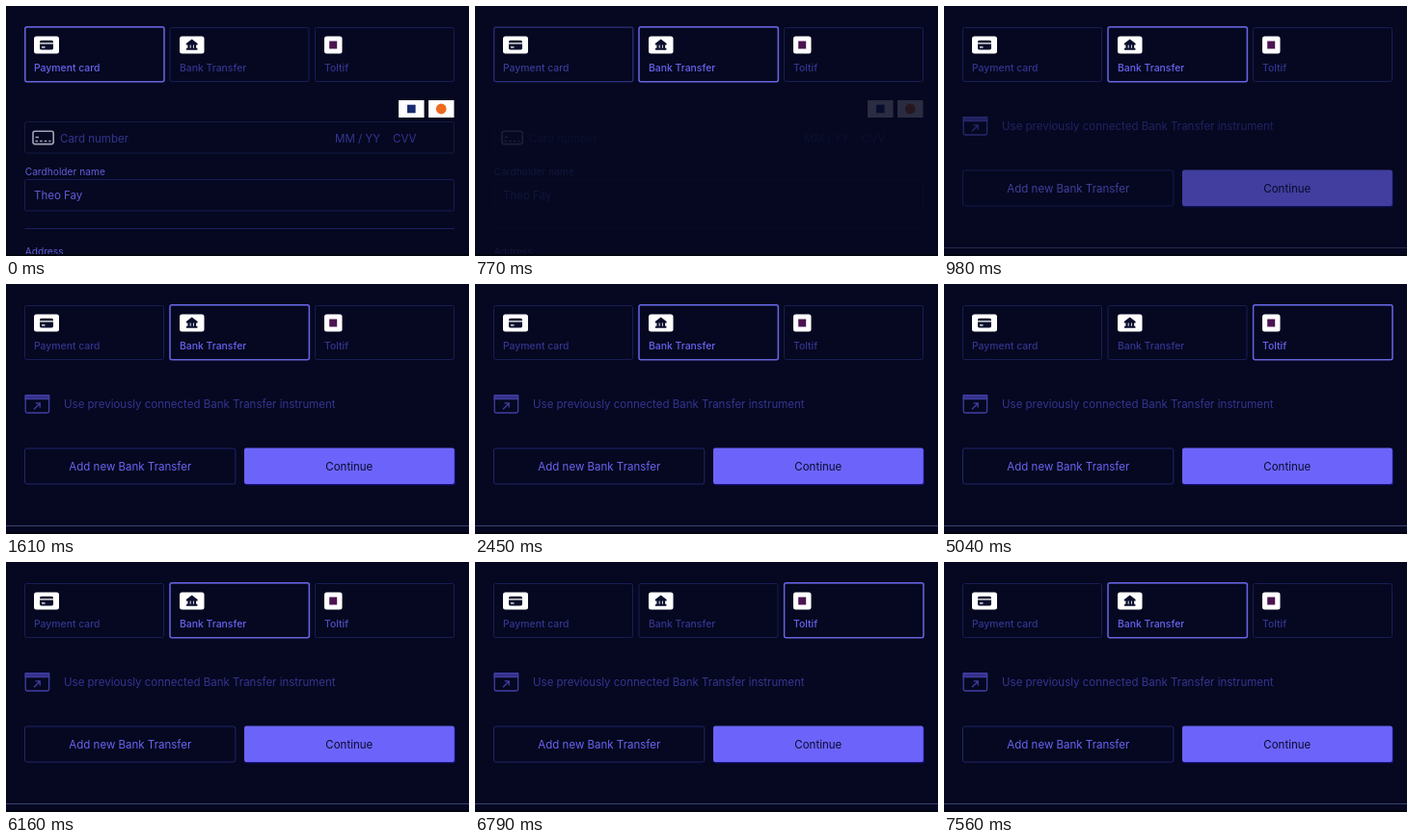
Recreate the animation shown at these times as an HTML page. Size 480 by 260 pixels, loop 7630 ms.

```html
<!DOCTYPE html>
<html lang="en">
<head>
<meta charset="utf-8">
<title>Payment method</title>
<style>
  @property --on  { syntax: "<number>"; inherits: true; initial-value: 0; }
  @property --lit { syntax: "<number>"; inherits: true; initial-value: 0; }

  :root {
    --bg: #050820;
    --bright: #6862ee;
    --dim: #353490;
    --edge: #1a1d56;
    --loop: 7630ms;
  }
  html, body { margin: 0; width: 100%; height: 100%; overflow: hidden; background: var(--bg); }
  svg { display: block; width: 480px; height: 260px; }
  text { font: 400 11.5px Inter, Roboto, sans-serif; fill: var(--dim); }
  .small { font-size: 10.2px; fill: #615cd8; }
  .value { fill: #5f5ad8; }
  .mid { text-anchor: middle; }
  .box { fill: none; stroke: var(--edge); }

  .tab text {
    font-weight: 500;
    font-size: 10.4px;
    fill: color-mix(in srgb, var(--bright) calc(var(--lit) * 100%), var(--dim));
  }
  .ring { fill: none; stroke: #6663de; stroke-width: 1.5; opacity: var(--on); }
  .tile { fill: #fff; }
  .ink { fill: #0a0e2c; }

  .tab, .form, .panel { animation: var(--loop) linear infinite; }
  .card { animation-name: card; }
  .bank { animation-name: bank; }
  .wallet { animation-name: wallet; }
  .form { animation-name: form; }
  .panel { animation-name: panel; }

  @keyframes card {
    0%, 7.08% { --on: 1; --lit: 1; }
    10.1% { --on: .25; --lit: .1; }
    11.2%, 100% { --on: 0; --lit: 0; }
  }
  @keyframes bank {
    0%, 7.08% { --on: 0; --lit: 0; }
    10%, 48.5% { --on: 1; --lit: 1; }
    51.8%, 68.8% { --on: 0; --lit: 0; }
    72.7%, 81.3% { --on: 1; --lit: 1; }
    84.5%, 89.8% { --on: 0; --lit: 0; }
    93.7%, 100% { --on: 1; --lit: 1; }
  }
  /* the label lights up on hover, just before the ring follows */
  @keyframes wallet {
    0%, 47% { --on: 0; --lit: 0; }
    47.7% { --on: 0; --lit: .55; }
    48.5% { --on: 0; --lit: .65; }
    51.8%, 68.8% { --on: 1; --lit: 1; }
    72.7%, 79.7% { --on: 0; --lit: 0; }
    80.7% { --on: 0; --lit: .55; }
    81.3% { --on: 0; --lit: .65; }
    84.5%, 89.8% { --on: 1; --lit: 1; }
    93.7%, 100% { --on: 0; --lit: 0; }
  }
  @keyframes form {
    0%, 7.08% { opacity: 1; }
    10.62%, 100% { opacity: 0; }
  }
  @keyframes panel {
    0%, 10.62% { opacity: 0; }
    14.4%, 100% { opacity: 1; }
  }
</style>
</head>
<body>
<svg viewBox="0 0 480 260">
  <rect width="480" height="260" fill="#050820"/>

  <g class="tab card">
    <rect class="box" x="19.5" y="22.5" width="144" height="56" rx="2"/>
    <rect class="ring" x="19.8" y="21.8" width="144.2" height="57" rx="2"/>
    <rect class="tile" x="29" y="31.5" width="26" height="18" rx="2.5"/>
    <rect class="ink" x="35" y="35.8" width="14" height="9.6" rx="1.6"/>
    <path d="M35 38.8h14M37 42.8h3.5" stroke="#fff" stroke-width="1.2"/>
    <text x="29" y="67.6">Payment card</text>
  </g>

  <g class="tab bank">
    <rect class="box" x="170" y="22.5" width="144" height="56" rx="2"/>
    <rect class="ring" x="170" y="21.8" width="144.4" height="57" rx="2"/>
    <rect class="tile" x="180" y="31.5" width="25.5" height="18" rx="2.5"/>
    <path class="ink" d="M192.7 34.6 198.6 39V40.4H186.8V39ZM188.4 40h2.3v4h-2.3ZM191.6 40h2.3v4h-2.3ZM194.8 40h2.3v4h-2.3ZM187 43.8h11.4v2H187Z"/>
    <text x="180" y="67.6">Bank Transfer</text>
  </g>

  <g class="tab wallet">
    <rect class="box" x="320.5" y="22.5" width="144" height="56" rx="2"/>
    <rect class="ring" x="320.6" y="21.8" width="144.4" height="57" rx="2"/>
    <rect class="tile" x="330" y="31.5" width="18.5" height="18" rx="2.5"/>
    <rect x="335.2" y="36.5" width="8" height="8" fill="#4b1450"/>
    <text x="330" y="67.6">Toltif</text>
  </g>

  <g class="form">
    <rect class="tile" x="407" y="98" width="26.5" height="18"/>
    <rect x="416" y="102.7" width="8.6" height="8.6" fill="#1a2a70"/>
    <rect class="tile" x="438" y="98" width="26.5" height="18"/>
    <circle cx="451.2" cy="107" r="5.4" fill="#ee6a1e"/>

    <rect class="box" x="19.5" y="120.5" width="445" height="32.5" rx="2" style="stroke:#171b44"/>
    <g fill="none" stroke="#a2a2b8" stroke-width="1.6">
      <rect x="28" y="130.2" width="21.2" height="13.4" rx="2"/>
      <path d="M30.5 136.6h3.5M30.5 140.4h2.6m2 0h2.6m2 0h2.6m2 0h2.2" stroke-width="1.5"/>
    </g>
    <text x="56" y="141.6">Card number</text>
    <text x="341" y="141.6">MM / YY</text>
    <text x="401" y="141.6">CVV</text>

    <text class="small" x="19.7" y="176">Cardholder name</text>
    <rect class="box" x="19.5" y="180.5" width="445" height="32.5" rx="2"/>
    <text class="value" x="29" y="201.4">Theo Fay</text>
    <path d="M19.5 231.5H465" stroke="#1c1f5e"/>
    <text class="small" x="19.7" y="258.9">Address</text>
  </g>

  <g class="panel">
    <g fill="none" stroke="#413ea4" stroke-width="1.3">
      <path d="M20.2 115.6h24.4v4h-24.4Z" fill="#34318a"/>
      <rect x="20.2" y="115.6" width="24.4" height="18.4" rx="1.8"/>
      <path d="M29 130.2l6-6M30.6 123.8h4.6v4.6"/>
    </g>
    <text x="60" y="129.4">Use previously connected Bank Transfer instrument</text>

    <rect class="box" x="19.5" y="171" width="218.3" height="37" rx="2" style="stroke:#22256a"/>
    <text class="mid" x="128.8" y="193.8" style="fill:#6a63f0">Add new Bank Transfer</text>
    <rect x="247.5" y="171.5" width="218.3" height="37.8" rx="2" fill="#2218a8" opacity=".7"/>
    <rect x="247" y="170.5" width="217.8" height="37.5" rx="2" fill="#6c64fa"/>
    <text class="mid" x="355.8" y="193.8" style="fill:#0a0c30">Continue</text>
    <path d="M0 251.5H480" stroke="#3a4270"/>
  </g>

  <rect y="258" width="480" height="2" fill="#02040f"/>
</svg>
</body>
</html>
```
